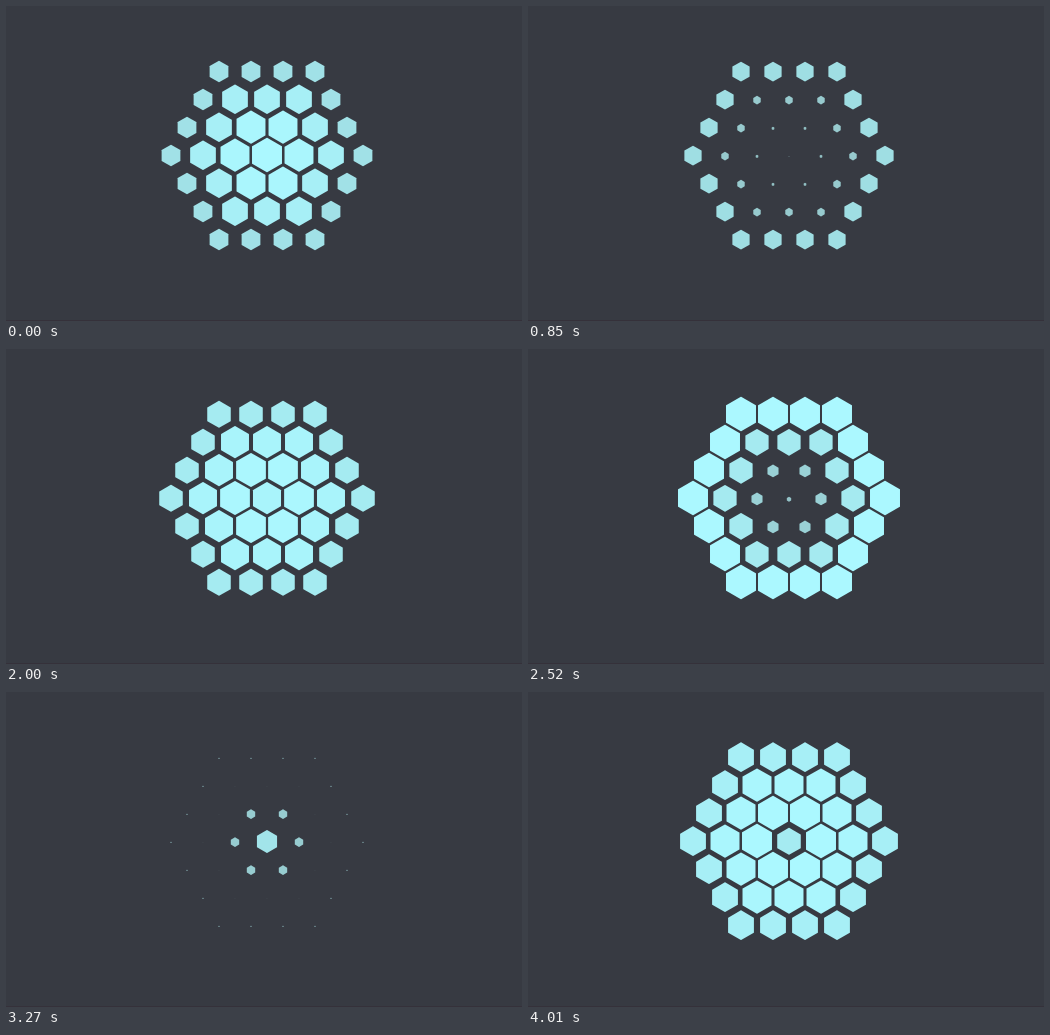
An HTML page with a canvas that plays this animation: 516x315 px, repeating every 4110 ms.

```html
<!DOCTYPE html>
<html lang="en">
<head>
<meta charset="utf-8">
<title>Honeycomb pulse</title>
<style>
  html, body { margin: 0; height: 100%; overflow: hidden; background: #373a42; }
  canvas { display: block; }
</style>
</head>
<body>
<canvas id="stage" width="516" height="315"></canvas>
<script>
const ctx = document.getElementById('stage').getContext('2d');
const LOOP = 4110, STEP = 57.3, LAST = 70;
const BRIGHT = [171, 248, 255], DIM = [144, 187, 191];

// Slightly uneven pace: [step, seconds into the pulse]
const PACE = [[0, -.04], [8, .42], [24, 1.425], [35, 2.08], [44, 2.57], [57, 3.39], [70, 4.165]];

const mix = (a, b, k) => a + (b - a) * k;

// CSS "ease": cubic-bezier(.25, .1, .25, 1)
function ease(x) {
  const bez = (a, b, u) => 3 * (1 - u) ** 2 * u * a + 3 * (1 - u) * u * u * b + u ** 3;
  let lo = 0, hi = 1;
  for (let i = 0; i < 20; i++) {
    const mid = (lo + hi) / 2;
    if (bez(.25, .25, mid) < x) lo = mid; else hi = mid;
  }
  return bez(.1, 1, lo);
}

// 0 = full and bright, 1 = shrunk and dim; each half takes one second
function shrink(seconds) {
  const p = ((seconds % 2) + 2) % 2;
  return p < 1 ? ease(p) : 1 - ease(p - 1);
}

function pulseTime(step) {
  const i = Math.max(1, PACE.findIndex(([s]) => s >= step));
  const [[s0, t0], [s1, t1]] = [PACE[i - 1], PACE[i]];
  return mix(t0, t1, (step - s0) / (s1 - s0));
}

// Outline of three 30 x 17 bars turned by 60 degrees
const hex = new Path2D();
const corner = Math.atan2(8.5, 15), radius = Math.hypot(8.5, 15);
for (let i = 0; i < 6; i++) {
  for (const side of [-1, 1]) {
    const a = i * Math.PI / 3 + side * corner;
    hex.lineTo(radius * Math.cos(a), radius * Math.sin(a) - 1.5);
  }
}
hex.closePath();

const cells = [];
for (let r = -3; r <= 3; r++) {
  for (let q = -3; q <= 3; q++) {
    const ring = Math.max(Math.abs(q), Math.abs(r), Math.abs(q + r));
    if (ring <= 3) cells.push({ x: 261 + 32 * q + 16 * r, y: 150.5 + 28 * r, ring });
  }
}

function draw(now) {
  const step = Math.min(LAST, Math.floor((now % LOOP + 14) / STEP));
  const time = pulseTime(step);
  ctx.fillStyle = '#373a42';
  ctx.fillRect(0, 0, 516, 315);
  ctx.fillStyle = '#35313a';
  ctx.fillRect(0, 314, 516, 1);
  for (const { x, y, ring } of cells) {
    const k = shrink(time - ring * .2);
    const scale = mix(1, .01, k);
    ctx.fillStyle = `rgb(${BRIGHT.map((c, i) => Math.round(mix(c, DIM[i], k)))})`;
    ctx.setTransform(scale, 0, 0, scale, x, y);
    ctx.fill(hex);
  }
  ctx.resetTransform();
}

let start;
function tick(now) {
  start ??= now;
  draw(now - start);
  requestAnimationFrame(tick);
}
draw(0);
requestAnimationFrame(tick);
</script>
</body>
</html>
```
